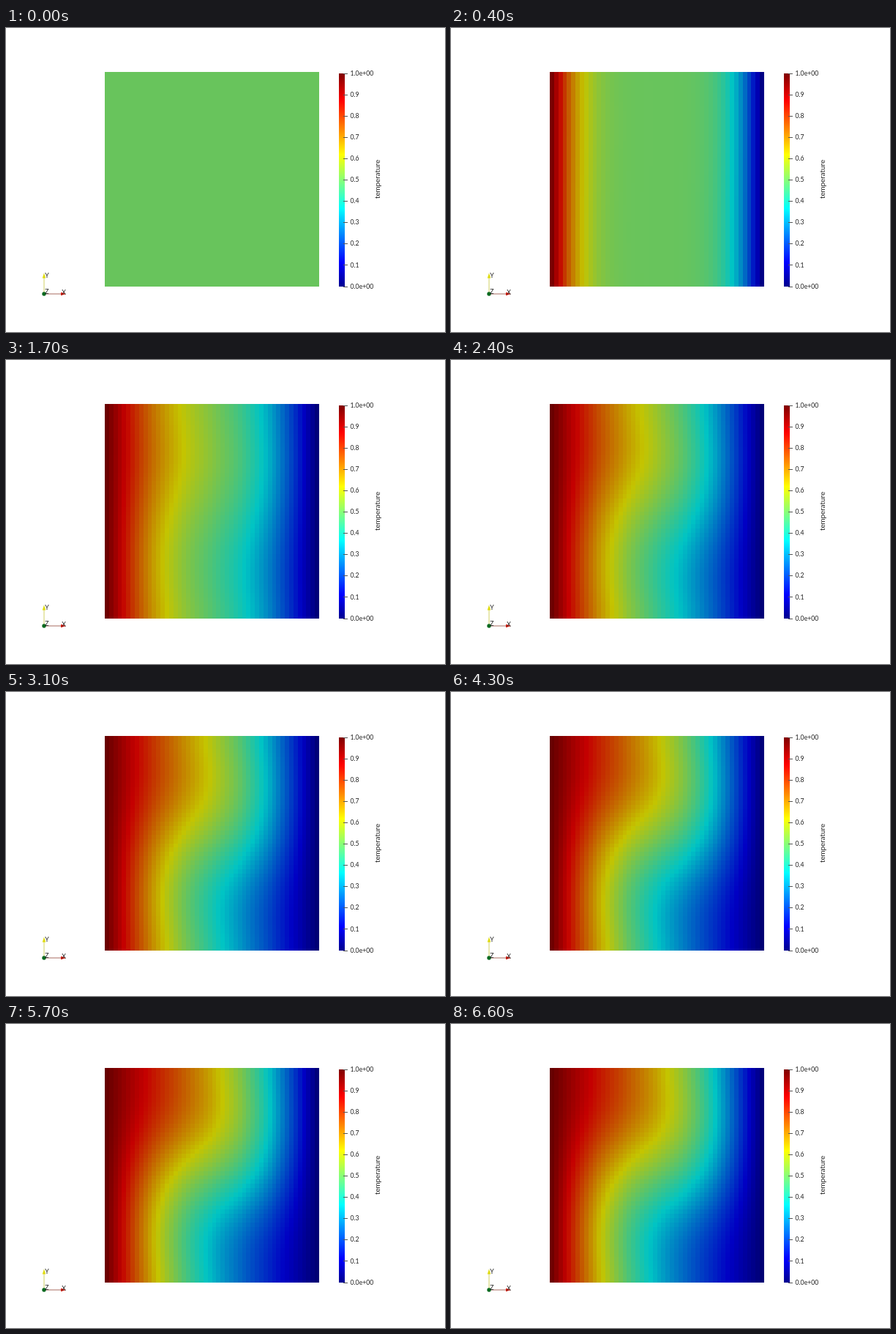
An HTML page with a canvas that plays this animation: 600x415 px, repeating every 6.7 s.

```html
<!DOCTYPE html>
<html lang="en">
<head>
<meta charset="utf-8">
<title>Heated cavity</title>
<style>
  html, body { margin: 0; width: 100%; height: 100%; overflow: hidden; background: #fff; }
  canvas, svg { position: absolute; left: 0; top: 0; }
  text { font-family: Lato, "Open Sans", sans-serif; font-size: 8.7px; fill: #222; }
</style>
</head>
<body>
<canvas id="stage" width="600" height="415"></canvas>
<svg id="overlay" width="600" height="415" viewBox="0 0 600 415">
  <text transform="translate(511 206.5) rotate(-90)" text-anchor="middle" style="font-size:9.8px">temperature</text>
  <path d="M52 363V341" stroke="#d2d264"/>
  <path d="M52 363H76" stroke="#a86a60"/>
  <path d="M52 334.5L54.3 341.5H49.7Z" fill="#e0dc10"/>
  <path d="M82 363L75 365.2V360.8Z" fill="#d41c10"/>
  <circle cx="52" cy="363" r="2.7" fill="#0b6a20"/>
  <text x="53.3" y="341">Y</text>
  <text x="53.3" y="363">Z</text>
  <text x="76.3" y="364">X</text>
</svg>
<script>
const N = 50, H = 1 / N;
const FRAMES = 67, FRAME_MS = 100, SUBSTEPS = 40;
const DIFFUSION = 0.023, BUOYANCY = 10 * DIFFUSION;
const BOX = { x: 135, y: 60, size: 293 };
const BAR = { x: 455, y: 62, w: 8, h: 291 };

const ctx = document.getElementById('stage').getContext('2d');
const overlay = document.getElementById('overlay');

// Rainbow map: three shifted trapezoids for red, green and blue.
const jet = (t, light) => [2.9375, 1.9375, 0.9375].map(c =>
  Math.round(255 * light * Math.max(0, Math.min(1, 1.5 - Math.abs(t * 3.9375 - c)))));

// Shape of one convection cell, sin²(πx)·sin²(πy), as velocity per unit strength.
const flowX = new Float64Array(N * N), flowY = new Float64Array(N * N);
for (let j = 0; j < N; j++) {
  const y = Math.PI * (1 - (j + 0.5) * H);
  for (let i = 0; i < N; i++) {
    const x = Math.PI * (i + 0.5) * H;
    flowX[j * N + i] = -Math.PI * Math.sin(x) ** 2 * Math.sin(2 * y);
    flowY[j * N + i] = Math.PI * Math.sin(2 * x) * Math.sin(y) ** 2;
  }
}

// One step of heat transport: hot left wall, cold right wall, insulated top and bottom.
function step(temp, dt) {
  const next = new Float64Array(N * N);
  const strength = BUOYANCY * temp.reduce((sum, t, k) => sum + t * flowY[k], 0) * H * H;
  const spread = DIFFUSION * dt / (H * H), carry = strength * dt / (2 * H);
  for (let j = 0; j < N; j++) {
    for (let i = 0; i < N; i++) {
      const k = j * N + i, t = temp[k];
      const left = i ? temp[k - 1] : 2 - t;
      const right = i < N - 1 ? temp[k + 1] : -t;
      const up = j ? temp[k - N] : t;
      const down = j < N - 1 ? temp[k + N] : t;
      next[k] = t + spread * (left + right + up + down - 4 * t)
        - carry * (flowX[k] * (right - left) + flowY[k] * (up - down));
    }
  }
  return next;
}

function paintField(temp) {
  const tile = document.createElement('canvas');
  tile.width = tile.height = N;
  const tileCtx = tile.getContext('2d');
  const image = tileCtx.createImageData(N, N);
  temp.forEach((t, k) => image.data.set([...jet(t, 0.77), 255], 4 * k));
  tileCtx.putImageData(image, 0, 0);
  return tile;
}

const fields = [];
let temp = new Float64Array(N * N).fill(0.5);
for (let f = 0; f < FRAMES; f++) {
  fields.push(paintField(temp));
  for (let s = 0; s < SUBSTEPS; s++) temp = step(temp, FRAME_MS / 1000 / SUBSTEPS);
}

function addSvg(name, attrs, content = '') {
  const el = document.createElementNS('http://www.w3.org/2000/svg', name);
  for (const key in attrs) el.setAttribute(key, attrs[key]);
  el.textContent = content;
  overlay.append(el);
}

function drawScale() {
  for (let r = 0; r < BAR.h; r++) {
    ctx.fillStyle = `rgb(${jet(1 - (r + 0.5) / BAR.h, 1)})`;
    ctx.fillRect(BAR.x, BAR.y + r, BAR.w, 1);
  }
  for (let n = 0; n <= 10; n++) {
    const y = BAR.y + BAR.h * (1 - n / 10);
    const label = n % 10 ? (n / 10).toFixed(1) : `${n / 10}.0e+00`;
    addSvg('path', { d: `M461 ${Math.floor(y) + 0.5}h6`, stroke: '#555' });
    addSvg('text', { x: 470.5, y: y + 2.6 }, label);
  }
}

function draw() {
  const frame = Math.floor(performance.now() / FRAME_MS) % FRAMES;
  ctx.drawImage(fields[frame], BOX.x, BOX.y, BOX.size, BOX.size);
  requestAnimationFrame(draw);
}

ctx.imageSmoothingEnabled = false;
drawScale();
draw();
</script>
</body>
</html>
```
